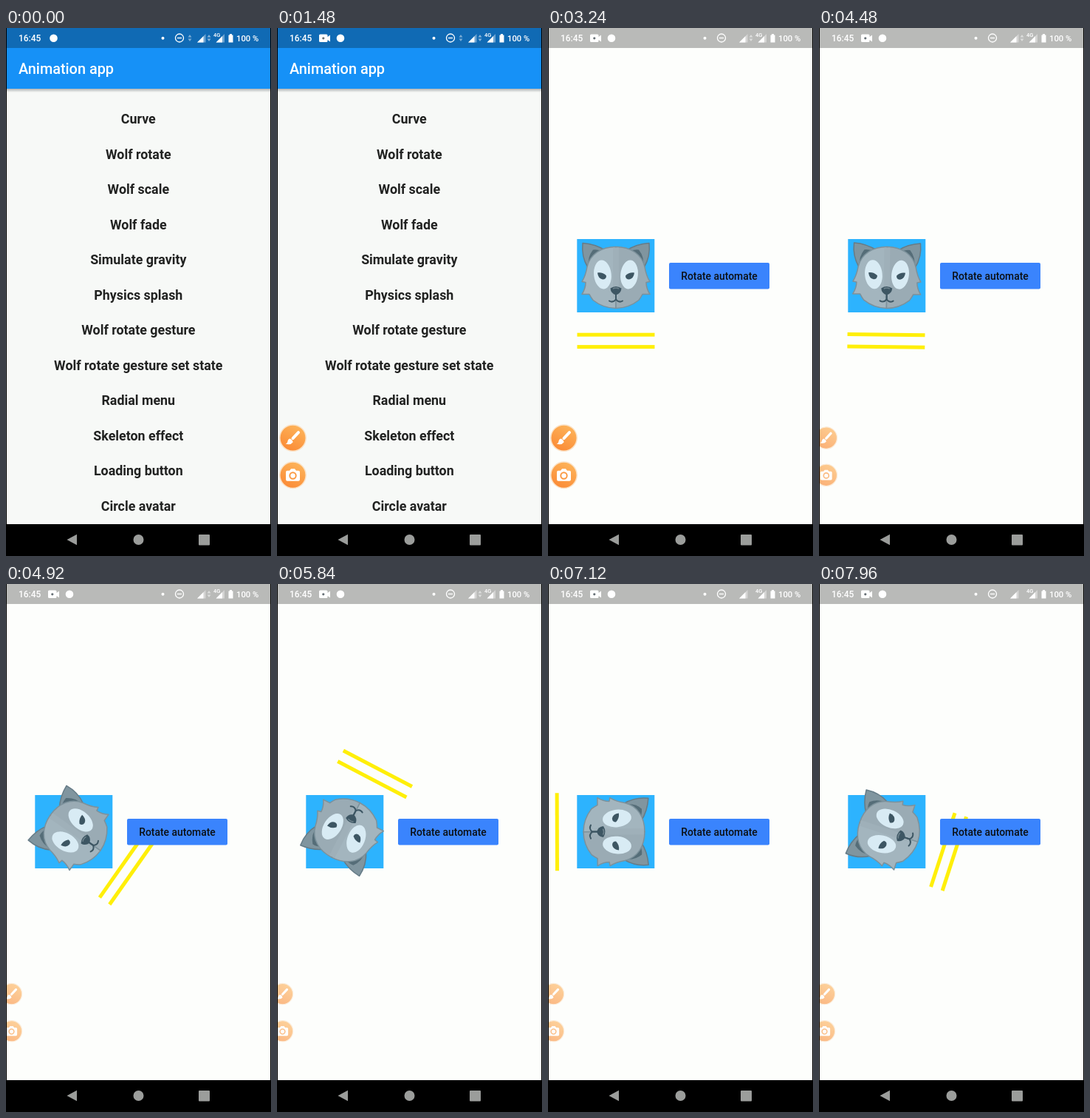
These frames come from a looping animation (359x713 px, 8 s). An HTML page:

```html
<!DOCTYPE html>
<html lang="en">
<head>
<meta charset="utf-8">
<title>Animation app</title>
<style>
  html, body { margin: 0; width: 100%; height: 100%; overflow: hidden; background: #000; }
  svg { display: block; width: 100vw; height: 100vh; }
  text { font-family: Roboto, sans-serif; font-weight: 500; }
  .item { font-size: 17.87px; font-weight: 700; fill: #212221; text-anchor: middle; }
</style>
</head>
<body>
<svg viewBox="0 0 359 713" preserveAspectRatio="none">
  <defs>
    <linearGradient id="shade" x2="0" y2="1">
      <stop offset="0" stop-color="#000" stop-opacity=".28"/>
      <stop offset="1" stop-color="#000" stop-opacity="0"/>
    </linearGradient>
    <linearGradient id="orange" x1=".8" y1="0" x2=".3" y2="1">
      <stop offset="0" stop-color="#fdb65c"/>
      <stop offset="1" stop-color="#fb8a35"/>
    </linearGradient>
    <clipPath id="screen"><rect x="1" width="357" height="670"/></clipPath>
    <clipPath id="rowClip"><rect x="37" y="434" width="285.500" height="42" rx="2"/></clipPath>
    <path id="arrows" d="M0-4.500 2.500-1h-5zM0 4.500 2.500 1h-5z"/>
    <g id="signal">
      <path d="M0 0 11.500-11.500V0z" opacity=".4"/>
      <path d="M0 0 8.500-8.500V0z"/>
    </g>
    <g id="disc">
      <circle r="17.700" fill="url(#orange)" stroke="#fbe2c6" stroke-width="1.500"/>
    </g>
    <g id="ear">
      <path d="M-45-44Q-28-43-14-34L-38-11Q-47-26-45-44Z" fill="#80959f" stroke="#667c87" stroke-width="1.500" stroke-linejoin="round"/>
      <path d="M-31-35Q-24-36-17-32L-37-12Q-39-25-31-35Z" fill="#556d78"/>
    </g>
    <path id="half" d="M0-39C-20-39-35-29-39-12Q-41 0-46 8L-41 9Q-41 17-46 25L-36 25Q-34 29-31 33C-22 40-10 44 0 44Z"/>
    <g id="face">
      <ellipse cx="-18" cy="-1.500" rx="11.800" ry="19.500" transform="rotate(-6 -18 -1)" fill="#d8ebf4"/>
      <path d="M-25-4Q-18-5-13 0Q-13 5-18 5Q-24 4-25-4Z" fill="#3d5663"/>
      <path d="M0 24V32Q-4 37-9 34" fill="none" stroke="#3d5663" stroke-width="2" stroke-linecap="round"/>
    </g>
  </defs>

  <g clip-path="url(#screen)">
    <rect width="359" height="670" fill="#f7f9f7"/>
    <g id="press" clip-path="url(#rowClip)">
      <rect x="37" y="434" width="286" height="42" fill-opacity=".17"/>
      <circle id="ripple" cx="211" cy="455" fill-opacity=".13"/>
    </g>
    <g id="list"></g>
    <rect y="82" width="359" height="5" fill="url(#shade)"/>
    <rect width="359" height="82" fill="#1691f7"/>
    <text x="17" y="62" font-size="19.860" fill="#fff">Animation app</text>

    <g id="page">
      <rect width="359" height="713" fill="#fdfefc"/>
      <rect x="39.300" y="285" width="105" height="99" fill="#2db3fe"/>
      <g id="bars" fill="#ffef08">
        <rect x="-52.500" y="77.200" width="105" height="5"/>
        <rect x="-52.500" y="93.600" width="105" height="5"/>
      </g>
      <g id="wolf">
        <use href="#ear"/>
        <use href="#ear" transform="scale(-1 1)"/>
        <g stroke="#7c919b" stroke-width="1.500" stroke-linejoin="round">
          <use href="#half" fill="#a3b5be"/>
          <use href="#half" transform="scale(-1 1)" fill="#9aabb4"/>
        </g>
        <path d="M-4-38H4V30H-4Z" fill="#9fb0b9"/>
        <use href="#face"/>
        <use href="#face" transform="scale(-1 1)"/>
        <path d="M-7.500 17Q0 12 7.500 17Q7 24 0 26Q-7 24-7.500 17Z" fill="#3d5663"/>
        <path d="M-4 17.500Q0 15.500 4 17.500" fill="none" stroke="#71858f" stroke-width="1.500"/>
      </g>
      <rect x="164" y="317" width="136" height="35.500" rx="2" fill="#3a84fd"/>
      <text x="232" y="339.600" font-size="13.900" text-anchor="middle" fill="#0c1014">Rotate automate</text>
    </g>

    <rect width="359" height="27" fill-opacity=".27"/>
    <g fill="#fff">
      <text x="17" y="18" font-size="11.900">16:45</text>
      <g id="video">
        <path d="M58.500 8.500h8.500q1.500 0 1.500 1.500v2l3.500-2.500v9l-3.500-2.500v1.500q0 1.500-1.500 1.500h-8.500q-1.500 0-1.500-1.500v-7.500q0-1.500 1.500-1.500z"/>
        <circle cx="62.800" cy="13.800" r="1.600" fill="#666f75"/>
      </g>
      <circle id="badge" cy="13.800" r="5.300"/>
      <circle cx="212.500" cy="13.800" r="2"/>
      <circle cx="235" cy="13.500" r="5.500" fill="none" stroke="#fff" stroke-width="1.300"/>
      <path d="M232 12.800h6v1.400h-6z"/>
      <use href="#signal" x="259" y="19.500"/>
      <use href="#signal" x="284.500" y="19.500"/>
      <path d="M301.500 9.500h1.500V8h3v1.500h1.500v10h-6z"/>
      <use id="arrowA" href="#arrows" x="249" y="13.500"/>
      <use id="arrowB" href="#arrows" x="275" y="13.500"/>
      <text x="281" y="12" font-size="7.500" font-weight="700">4G</text>
      <text x="312" y="18" font-size="11.300">100 %</text>
    </g>

    <g id="brush">
      <use href="#disc"/>
      <path d="M7.500-7.500 0 .500" stroke="#fff" stroke-width="4" stroke-linecap="round"/>
      <path d="M-4 1Q0 3 0 6Q-3 10-10 8Q-7 7-7 4Q-6 1-4 1Z" fill="#fff"/>
    </g>
    <g id="camera">
      <use href="#disc"/>
      <path d="M-7.500-6h3l2-2.500h5l2 2.500h3q2 0 2 2V6q0 2-2 2h-15q-2 0-2-2V-4q0-2 2-2z" fill="#fff"/>
      <circle cy=".700" r="4.200" fill="#fff" stroke="#fb9a43" stroke-width="2"/>
    </g>
  </g>

  <g fill="#9b9d9b">
    <path d="M82.500 691 96 683.800v14.400z"/>
    <circle cx="179.500" cy="691" r="7"/>
    <rect x="261" y="684" width="15" height="14.500" rx="1"/>
  </g>
</svg>
<script>
const LOOP = 8000;
const $ = id => document.getElementById(id);
const set = (id, attrs) => {
  for (const k in attrs) $(id).setAttribute(k, attrs[k]);
};
const mix = (a, b, p) => a + (b - a) * p;
const ramp = (t, from, to) => Math.min(1, Math.max(0, (t - from) / (to - from)));
const easeOut = p => 1 - (1 - p) ** 2;

const names = ["Curve", "Wolf rotate", "Wolf scale", "Wolf fade", "Simulate gravity",
  "Physics splash", "Wolf rotate gesture", "Wolf rotate gesture set state",
  "Radial menu", "Skeleton effect", "Loading button", "Circle avatar"];
$("list").innerHTML = names.map((name, i) =>
  `<text class="item" x="179.300" y="${129.2 + i * 47.52}">${name}</text>`).join("");

// The finger swings the wolf back and forth: [time, degrees] at each turning point
const swings = [[4480, 0], [4920, 305.5], [5160, 228], [5560, 314], [5840, 207.4],
  [6520, 288], [6960, 458], [7120, 450], [7960, 288]];
const angle = t => swings.slice(1).reduce((sum, [end, deg], i) =>
  sum + (deg - swings[i][1]) * ramp(t, swings[i][0], end), 0);

function draw(t) {
  const transform = `translate(92 334.500) rotate(${angle(t)})`;
  set("wolf", { transform });
  set("bars", { transform });

  set("press", { opacity: ramp(t, 2200, 2340) - ramp(t, 2460, 2720) });
  set("ripple", { r: mix(40, 200, ramp(t, 2220, 2430)) });

  const open = ramp(t, 2740, 3080);
  set("page", { opacity: open, transform: `translate(0 ${100 * (1 - open) ** 3})` });

  const intro = easeOut(ramp(t, 40, 640));
  const dock = ramp(t, 4280, 4520);
  const x = mix(21.5, 7.5, dock) - 40 * (1 - intro);
  const scale = mix(1, .8, dock);
  const opacity = intro * mix(1, .6, dock);
  set("brush", { opacity, transform: `translate(${x} 553.600) scale(${scale})` });
  set("camera", { opacity, transform: `translate(${x} 603.800) scale(${scale})` });

  const slide = easeOut(ramp(t, 40, 400));
  set("video", { opacity: slide });
  set("badge", { cx: mix(64.5, 86, slide) });
  set("arrowA", { opacity: t < 2800 ? .45 : 0 });
  set("arrowB", { opacity: t < 6760 ? .5 : 0 });
}

const start = performance.now();
function tick() {
  draw((performance.now() - start) % LOOP);
  requestAnimationFrame(tick);
}
tick();
</script>
</body>
</html>
```
